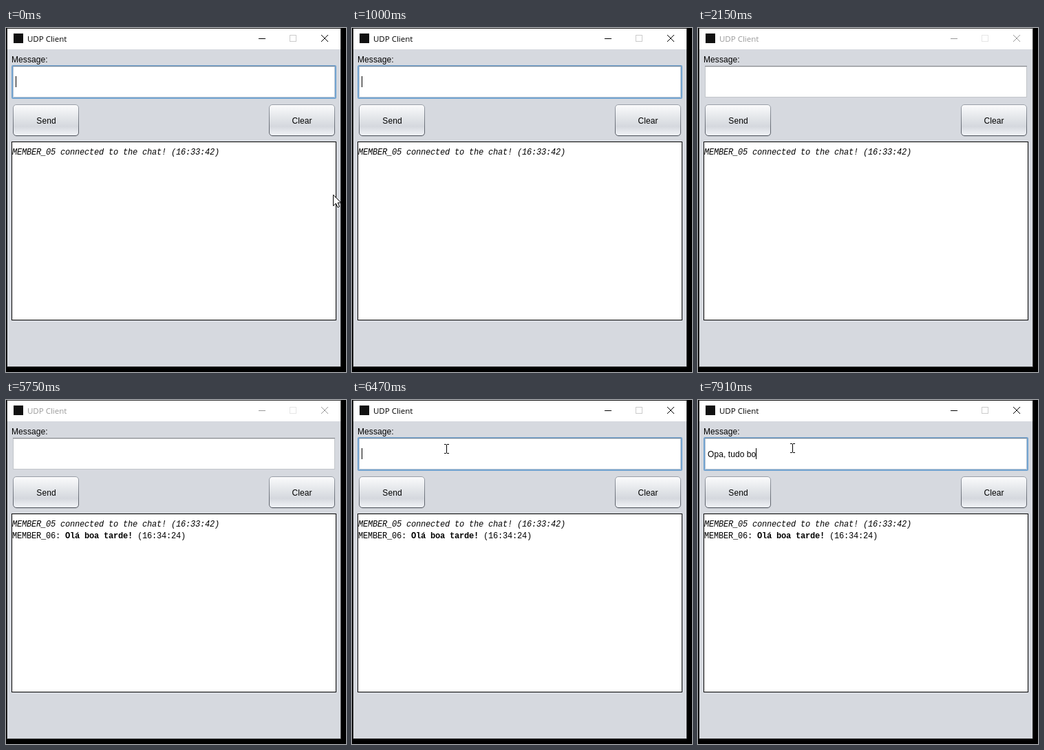
An HTML page for the animation above (8000 ms loop, 494 by 500 pixels).

```html
<!DOCTYPE html>
<html lang="en">
<head>
<meta charset="utf-8">
<title>UDP Client</title>
<style>
  html, body { margin: 0; width: 100%; height: 100%; overflow: hidden; background: #000; }
  svg { display: block; }
  text { font: 12px "Liberation Sans", Arial, sans-serif; letter-spacing: .08px; white-space: pre; }
  .title { font: 11.5px "Open Sans", "Noto Sans", sans-serif; letter-spacing: 0; }
  .log text { font: 12px "Liberation Mono", "Courier New", monospace; letter-spacing: -.2px; }
  .log .notice { font-style: italic; }
  .log .body { font-weight: bold; }
  #win { --ink: #000; --dim: #ccc; --edge: #1c1c1c; }
  #win.idle { --ink: #999; --dim: #e6e6e6; --edge: #3c3c3c; }
  .title { fill: var(--ink); }
  .edge { fill: var(--edge); }
  .controls { fill: none; stroke: var(--ink); }
  .controls .off { stroke: var(--dim); }
  #win.idle .focus, #win:not(.idle) .plain { display: none; }
</style>
</head>
<body>
<svg width="494" height="500" viewBox="0 0 494 500">
  <defs>
    <linearGradient id="face" x2="0" y2="1">
      <stop offset="0" stop-color="#fbfbfc"/>
      <stop offset=".3" stop-color="#eaecef"/>
      <stop offset=".5" stop-color="#dfe2e6"/>
      <stop offset=".7" stop-color="#d5d8de"/>
      <stop offset="1" stop-color="#f2f4f8"/>
    </linearGradient>
    <linearGradient id="rim" x2="0" y2="1">
      <stop offset="0" stop-color="#9a9fa8"/>
      <stop offset="1" stop-color="#555a63"/>
    </linearGradient>
    <g id="button">
      <rect x="1" y="2" width="95" height="45" rx="5" fill="#bfc3ca"/>
      <rect x=".5" y=".5" width="95" height="45" rx="4.5" fill="url(#face)" stroke="url(#rim)"/>
    </g>
    <path id="arrow" d="M.5 .5V16.5L4.3 13L7 18.7L9.6 17.5L7 12H11.8Z" fill="#fff" stroke="#000"/>
    <path id="beam" d="M-3 -6.5H0M1 -6.5H4M.5 -6V6M-3 6.5H0M1 6.5H4" fill="none" stroke="#000"/>
  </defs>

  <g id="win">
    <rect class="edge" x="1" width="486" height="493"/>
    <rect x="2" y="1" width="484" height="30" fill="#fff"/>
    <rect x="2" y="31" width="484" height="461" fill="#d6d9df"/>
    <rect x="11" y="8" width="14" height="14" fill="#111"/>
    <text class="title" x="31" y="20">UDP Client</text>
    <g class="controls">
      <path d="M367 15.5H377M458 10L468 20M468 10L458 20"/>
      <rect class="off" x="412.5" y="10.5" width="9" height="9"/>
    </g>

    <text x="8" y="50">Message:</text>
    <g class="plain">
      <rect x="10.5" y="55.5" width="467" height="45" fill="#fff" stroke="#c2c5ca"/>
      <path d="M10 55.5H478" stroke="#85888d"/>
      <path d="M11 56.5H477" stroke="#dedfe1"/>
    </g>
    <g class="focus">
      <rect x="9" y="55" width="470" height="47" rx="1" fill="#fff" stroke="#73a4d1" stroke-width="2"/>
      <path d="M10 55.5H478" stroke="#748aa0"/>
      <path d="M10.5 56V100.5H477.5V56" fill="none" stroke="#b7c5d3"/>
      <path d="M11 56.5H477" stroke="#d9dde1"/>
    </g>
    <text id="field" x="14" y="83"></text>
    <rect id="caret" y="70" width="1" height="16"/>

    <use href="#button" x="10" y="111"/>
    <use href="#button" x="382" y="111"/>
    <g text-anchor="middle">
      <text x="58.5" y="139">Send</text>
      <text x="430" y="139">Clear</text>
    </g>

    <rect x="8.5" y="165.5" width="471" height="259" fill="#fff" stroke="#000"/>
    <g class="log">
      <text class="notice" x="9" y="184">MEMBER_05 connected to the chat! (16:33:42)</text>
      <text id="reply" x="9" y="201">MEMBER_06: <tspan class="body">Olá boa tarde!</tspan> (16:34:24)</text>
    </g>
  </g>
  <use id="pointer"/>
</svg>
<script>
  const LOOP = 8000, REPLY_AT = 5750;
  const $ = id => document.getElementById(id);

  // Each table holds [start ms, value...]; a row stays until the next one.
  const focus = [[0, 1], [620, 0], [1000, 1], [2150, 0], [6380, 1]];
  const blink = [[0, 1], [450, 0], [1000, 1], [1530, 0], [1970, 1], [2150, 0], [6380, 1], [6920, 0], [7010, 1]];
  const typed = [
    [0, ""], [7010, "O"], [7210, "Op"], [7280, "Opa"], [7470, "Opa,"], [7560, "Opa, t"],
    [7640, "Opa, tu"], [7730, "Opa, tudo"], [7820, "Opa, tudo "], [7910, "Opa, tudo bo"]
  ];
  const pointer = [
    [0, "arrow", 475, 242], [190, "arrow", 313, 336], [270, ""],
    [1710, "arrow", 15, 381], [1810, ""],
    [6020, "arrow", 3, 108], [6110, "beam", 62, 86], [6200, "beam", 112, 75],
    [6290, "beam", 135, 71], [6380, "beam", 137, 71], [6560, "beam", 137, 70]
  ];

  const at = (table, t) => table.findLast(row => row[0] <= t).slice(1);
  const show = (el, on) => el.setAttribute("visibility", on ? "visible" : "hidden");

  function draw(t) {
    const [text] = at(typed, t);
    const [shape, x, y] = at(pointer, t);
    $("win").classList.toggle("idle", !at(focus, t)[0]);
    $("field").textContent = text;
    const width = text ? $("field").getComputedTextLength() : 0;
    $("caret").setAttribute("x", 14 + Math.round(width));
    show($("caret"), at(blink, t)[0]);
    show($("reply"), t >= REPLY_AT);
    show($("pointer"), shape);
    if (shape) {
      $("pointer").setAttribute("href", "#" + shape);
      $("pointer").setAttribute("transform", `translate(${x} ${y})`);
    }
  }

  const start = performance.now();
  function tick() {
    draw((performance.now() - start) % LOOP);
    requestAnimationFrame(tick);
  }
  tick();
</script>
</body>
</html>
```
